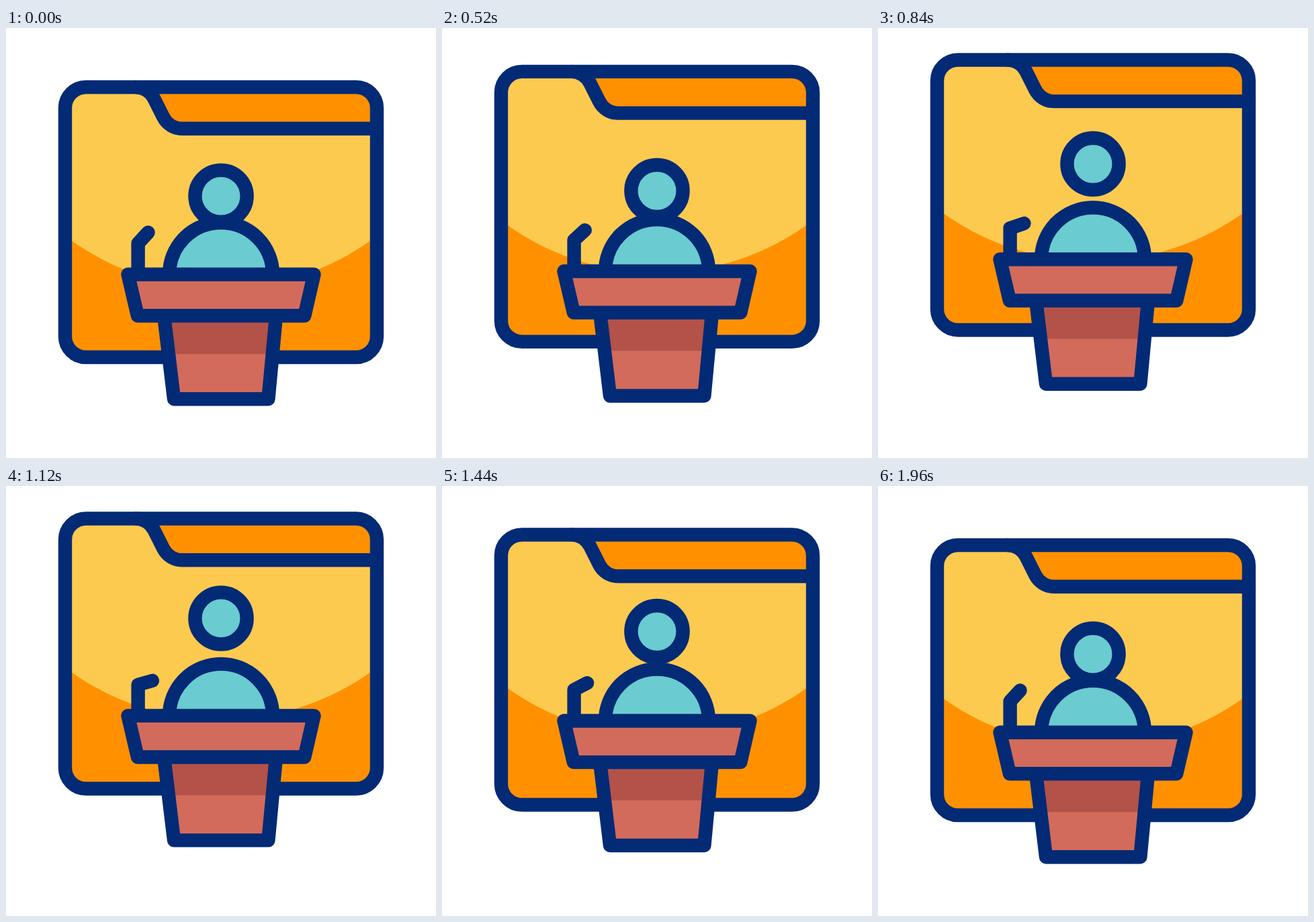
These frames come from a looping animation (640 by 640 pixels, 2 s). An HTML page:

```html
<!DOCTYPE html>
<html lang="en">
<head>
<meta charset="utf-8">
<title>Speaker at a podium</title>
<style>
  html, body { margin: 0; width: 100%; height: 100%; overflow: hidden; background: #fff; }
  svg { display: block; width: 100%; height: 100%; }
</style>
</head>
<body>
<svg viewBox="0 0 640 640" fill="none" stroke="#032a75" stroke-width="20.4" stroke-linecap="round" stroke-linejoin="round">
  <g id="folder">
    <rect x="88" y="88" width="464" height="402" rx="31" fill="#ff9100" stroke="none"/>
    <path fill="#fdca50" stroke="none" d="M88 309.6V119A31 31 0 0 1 119 88H192.6A31 31 0 0 1 220.4 105.2L234.1 132.5A31 31 0 0 0 261.9 149.7H552V309.6A384 384 0 0 1 88 309.6Z"/>
    <path d="M192.6 88A31 31 0 0 1 220.4 105.2L234.1 132.5A31 31 0 0 0 261.9 149.7H552"/>
    <rect x="88" y="88" width="464" height="402" rx="31"/>
  </g>
  <g id="stand">
    <path id="mic"/>
    <path fill="#6acbd0" d="M243 366.7A77 77 0 0 1 397 366.7"/>
    <path fill="#d26b5b" stroke="none" d="M235.1 428.3L250 552.2H390.4L402 428.3Z"/>
    <path fill="#b35248" stroke="none" d="M235.1 428.3L242 485.3H396.6L402 428.3Z"/>
    <path d="M235.1 428.3L250 552.2H390.4L402 428.3"/>
    <path fill="#d26b5b" d="M181.5 366.7H458.5L444.3 428.3H195.9Z"/>
  </g>
  <circle id="head" cx="320" cy="250.2" r="38.6" fill="#6acbd0"/>
</svg>
<script>
  const LOOP = 2000, STEP = 40;
  const [folder, stand, mic, head] = ["folder", "stand", "mic", "head"].map(id => document.getElementById(id));

  // Cubic bezier (.6, 0, .4, 1), solved by bisection
  function ease(u) {
    if (u <= 0) return 0;
    if (u >= 1) return 1;
    let lo = 0, hi = 1, s;
    for (let i = 0; i < 30; i++) {
      s = (lo + hi) / 2;
      const r = 1 - s;
      if (1.8 * s * r * r + 1.2 * s * s * r + s ** 3 < u) lo = s; else hi = s;
    }
    return s * s * (3 - 2 * s);
  }

  const lift = (t, upStart, upEnd, downStart, downEnd) =>
    ease((t - upStart) / (upEnd - upStart)) - ease((t - downStart) / (downEnd - downStart));

  const moveY = (el, y) => el.setAttribute("transform", `translate(0 ${y.toFixed(3)})`);

  function render(t) {
    const headLift = lift(t, 270, 1055, 1102, 1860);
    moveY(folder, -41.2 * lift(t, 48, 948, 953, 1837));
    moveY(stand, -24.8 * lift(t, 230, 1060, 1127, 1878));
    moveY(head, -53.3 * headLift);

    const angle = (47.4 - 31.7 * headLift) * Math.PI / 180;
    const tipX = 196.6 + 22.1 * Math.cos(angle);
    const tipY = 320.5 - 22.1 * Math.sin(angle);
    mic.setAttribute("d", `M196.6 366.7V320.5L${tipX.toFixed(3)} ${tipY.toFixed(3)}`);
  }

  const start = performance.now();
  function tick() {
    const t = (performance.now() - start) % LOOP;
    render(Math.floor(t / STEP) * STEP);
    requestAnimationFrame(tick);
  }
  render(0);
  requestAnimationFrame(tick);
</script>
</body>
</html>
```
